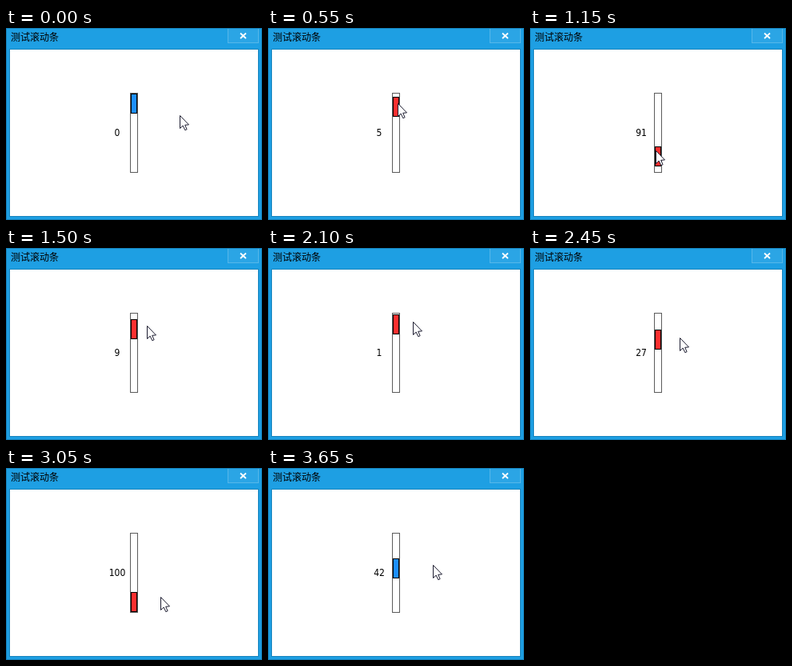
Animation, 320 px wide and 240 px high, one loop 4150 ms. Source, as an HTML page with a canvas:

```html
<!DOCTYPE html>
<html lang="zh">
<head>
<meta charset="utf-8">
<title>测试滚动条</title>
<style>
html, body { margin: 0; width: 100%; height: 100%; overflow: hidden; }
canvas { display: block; width: 100%; height: 100%; }
</style>
</head>
<body>
<canvas id="stage" width="320" height="240"></canvas>
<script>
const ctx = document.getElementById('stage').getContext('2d');
const LOOP = 4150, STEP = 50;

const linear = k => k;
const smooth = k => k * k * (3 - 2 * k);
const easeOut = k => 1 - (1 - k) * (1 - k);

// time, pointer x, pointer y, scroll value, easing towards this pose
const poses = [
  [0, 217, 109, 0, linear],
  [300, 162, 90, 0, smooth],
  [500, 162, 90, 0, linear],
  [550, 162, 94, 5, linear],
  [1050, 156, 165, 100, smooth],
  [1100, 156, 165, 100, linear],
  [1150, 157, 153, 91, linear],
  [1500, 176, 97, 9, easeOut],
  [1600, 176, 97, 9, linear],
  [1650, 176, 96, 8, linear],
  [1850, 176, 96, 8, linear],
  [2100, 181, 92, 1, linear],
  [2400, 186, 111, 25, smooth],
  [2450, 187, 112, 27, linear],
  [2950, 193, 163, 100, smooth],
  [3000, 193, 163, 100, linear],
  [3050, 193, 161, 100, linear],
  [3450, 206, 121, 42, smooth],
  [LOOP, 206, 121, 42, linear]
];

function poseAt(time) {
  const i = poses.findIndex(p => p[0] > time);
  const from = poses[i - 1], to = poses[i];
  const k = to[4]((time - from[0]) / (to[0] - from[0]));
  return [1, 2, 3].map(n => Math.round(from[n] + (to[n] - from[n]) * k));
}

function box(x, y, w, h, color) {
  ctx.fillStyle = color;
  ctx.fillRect(x, y, w, h);
}

function framed(x, y, w, h, edge, fill) {
  box(x, y, w, h, edge);
  box(x + 1, y + 1, w - 2, h - 2, fill);
}

function drawWindow() {
  framed(0, 0, 320, 240, '#1580b8', '#1e9fe3');
  framed(4, 26, 312, 210, '#1784bd', '#fff');

  framed(277, 0, 39, 19, '#56b7e9', '#2ba5e5');
  box(277, 0, 39, 1, '#1580b8');
  ctx.strokeStyle = '#fff';
  ctx.lineWidth = 1.8;
  ctx.beginPath();
  ctx.moveTo(293, 6.5);
  ctx.lineTo(300, 13);
  ctx.moveTo(300, 6.5);
  ctx.lineTo(293, 13);
  ctx.stroke();

  ctx.fillStyle = '#000';
  ctx.textAlign = 'left';
  ctx.font = '12px "Noto Sans CJK SC", "Noto Sans CJK", sans-serif';
  ctx.fillText('测试滚动条', 6, 16);
}

function drawSlider(value, pressed) {
  framed(155, 81, 10, 100, '#5c5c5c', '#fff');
  const top = 82 + Math.round(value * 0.73);
  framed(156, top, 8, 25, '#000', pressed ? '#ff3030' : '#1e90ff');

  ctx.fillStyle = '#000';
  ctx.textAlign = 'center';
  ctx.font = 'condensed 12px "DejaVu Sans", sans-serif';
  ctx.fillText(value, 139, 135);
}

function drawPointer(x, y) {
  const outline = [[0, 0], [0, 16], [3.7, 12.6], [6.3, 18.2], [8.6, 17.2], [6.2, 11.8], [11, 11.4]];
  ctx.beginPath();
  outline.forEach(([dx, dy]) => ctx.lineTo(x + 0.5 + dx, y + 0.5 + dy));
  ctx.closePath();
  ctx.fillStyle = '#fff';
  ctx.fill();
  ctx.strokeStyle = '#1c1c30';
  ctx.lineWidth = 1;
  ctx.stroke();
}

function render(now) {
  const time = Math.floor((now % LOOP) / STEP) * STEP;
  const [x, y, value] = poseAt(time);
  drawWindow();
  drawSlider(value, time >= 500 && time < 3650);
  drawPointer(x, y);
}

const start = performance.now();
function tick() {
  render(performance.now() - start);
  requestAnimationFrame(tick);
}
tick();
</script>
</body>
</html>
```
